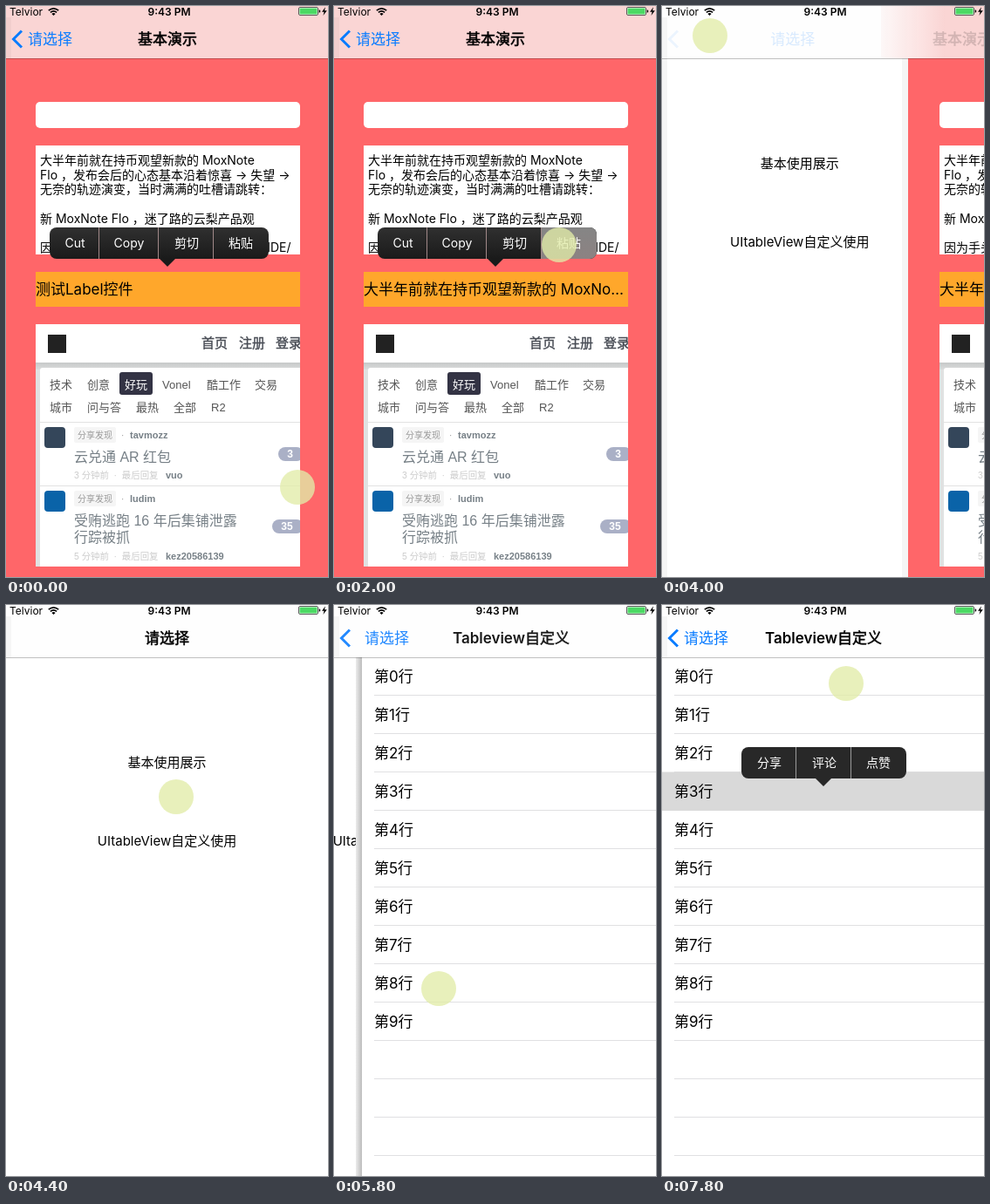
An HTML page that plays this animation: 369x655 px, repeating every 8000 ms.

```html
<!DOCTYPE html>
<html lang="zh-CN">
<head>
<meta charset="utf-8">
<title>基本演示</title>
<style>
@property --x { syntax: "<number>"; inherits: true; initial-value: 0; }

html, body { margin: 0; width: 100%; height: 100%; overflow: hidden; background: #fff; }
svg { display: block; width: 100%; height: 100%; }
text { font: 14px Inter, "Noto Sans CJK SC", "Noto Sans CJK", sans-serif; white-space: pre; }
.mid { text-anchor: middle; }
.t17 { font-size: 17px; }
.t15 { font-size: 15px; }
.t12 { font-size: 12px; }
.semi { font-weight: 600; }
.medium { stroke: #000; stroke-width: .5px; }
.blue { fill: #0a7cff; }
.menu text { fill: #fff; text-anchor: middle; }

.web text { font-family: "Liberation Sans", "Noto Sans CJK SC", "Noto Sans CJK", sans-serif; font-size: 13px; fill: #555; }
.web .head { font-size: 15px; fill: #484c55; stroke: #484c55; stroke-width: .4px; }
.web .tag { font-size: 10px; fill: #999; }
.web .user { font-size: 11px; font-weight: 700; fill: #778087; }
.web .topic { font-size: 16px; fill: #778087; }
.web .meta { font-size: 10.4px; fill: #ccc; }
.web .count { font-size: 12px; font-weight: 700; fill: #fff; text-anchor: middle; }

/* --x is the left edge of the pushed page */
#stage, .anim { animation: 8s step-end -10ms infinite; }
#stage { animation-name: slide; --p: calc(var(--x) / 369); }
.page { transform: translateX(calc(var(--x) * 1px)); }
.home { transform: translateX(calc((var(--x) - 369) * .315px)); }
.tint { transform: translateX(calc((var(--x) + min(40, var(--x))) * 1px)); }
.pageTitle { transform: translateX(calc(var(--x) * .56px)); }
.backText { transform: translateX(calc(134px * var(--p) * (.84 + .16 * var(--p)))); }
.pageTitle, .dim { opacity: calc(1 - 1.1 * var(--p)); }
.chevron { opacity: calc(1 - 1.2 * var(--p)); }
.fadeIn { opacity: calc((var(--p) - .8) * 5); }

#basic, #basicNav { animation-name: first; }
#table, #tableNav { animation-name: second; }
#edit { animation-name: edit; }
#paste { animation-name: paste; }
#before { animation-name: before; }
#after { animation-name: after; }
#back { animation-name: press; }
#edge { animation-name: edge; }
#row1 { animation-name: row1; }
#row3 { animation-name: row3; }
#share { animation-name: share; }
#dot { animation-name: dot; }

@keyframes slide {
  0% { --x: 0; } 47.5% { --x: 75; } 50% { --x: 284; } 52.5% { --x: 362; } 55% { --x: 369; }
  67.5% { --x: 357; } 70% { --x: 165; } 72.5% { --x: 32; } 75%, 100% { --x: 0; }
}
@keyframes first { 0% { opacity: 1; } 55%, 100% { opacity: 0; } }
@keyframes second { 0% { opacity: 0; } 62.5%, 100% { opacity: 1; } }
@keyframes edit { 0% { opacity: 1; } 27.5%, 100% { opacity: 0; } }
@keyframes paste { 0% { opacity: 0; } 20%, 100% { opacity: 1; } }
@keyframes before { 0% { opacity: 1; } 25%, 100% { opacity: 0; } }
@keyframes after { 0% { opacity: 0; } 25%, 100% { opacity: 1; } }
@keyframes press { 0% { opacity: 1; } 42.5% { opacity: .4; } 45% { opacity: .25; } 47.5%, 100% { opacity: 1; } }
@keyframes edge { 0% { opacity: 0; } 47.5% { opacity: 1; } 55%, 100% { opacity: 0; } }
@keyframes row1 { 0% { opacity: 0; } 82.5% { opacity: 1; } 95% { opacity: .5; } 97.5%, 100% { opacity: 0; } }
@keyframes row3 { 0% { opacity: 0; } 92.5%, 100% { opacity: 1; } }
@keyframes share {
  0% { opacity: 0; transform: translateY(-88px); }
  85% { opacity: 1; transform: translateY(-88px); }
  92.5% { opacity: 0; transform: none; }
  97.5%, 100% { opacity: 1; transform: none; }
}
@keyframes dot {
  0% { transform: translate(334px, 552px); }
  2.5% { transform: translate(318px, 505px); }
  5% { transform: translate(275px, 425px); }
  7.5% { transform: translate(205px, 340px); }
  10% { transform: translate(130px, 275px); }
  12.5% { transform: translate(80px, 330px); }
  15% { transform: translate(74px, 476px); }
  17.5% { transform: translate(27px, 59px); }
  20% { transform: translate(258px, 274px); }
  30% { transform: translate(300px, 420px); }
  32.5% { transform: translate(200px, 546px); }
  35% { transform: translate(110px, 300px); }
  37.5% { transform: translate(75px, 89px); }
  40% { transform: translate(55px, 34px); }
  52.5% { transform: translate(150px, 120px); }
  55% { transform: translate(195px, 220px); }
  57.5% { transform: translate(215px, 275px); }
  62.5% { transform: translate(208px, 262px); }
  65% { transform: translate(203px, 251px); }
  72.5% { transform: translate(120px, 440px); }
  75% { transform: translate(20px, 612px); }
  77.5% { transform: translate(254px, 93px); }
  82.5% { transform: translate(230px, 122px); }
  87.5% { transform: translate(228px, 150px); }
  90% { transform: translate(222px, 185px); }
  92.5% { transform: translate(218px, 219px); }
  95% { transform: translate(216px, 150px); }
  97.5%, 100% { transform: translate(211px, 90px); }
}
</style>
</head>
<body>
<svg id="stage" viewBox="0 0 369 655" preserveAspectRatio="none">
  <defs>
    <linearGradient id="shade">
      <stop offset="0" stop-color="#ececec"/>
      <stop offset="1" stop-color="#bcbcbc"/>
    </linearGradient>
    <linearGradient id="blush">
      <stop offset="0" stop-color="#fad5d4" stop-opacity=".15"/>
      <stop offset="1" stop-color="#fad5d4"/>
    </linearGradient>
    <linearGradient id="band" x2="0" y2="1">
      <stop offset="0" stop-color="#c6c8c8"/>
      <stop offset="1" stop-color="#dadcdc"/>
    </linearGradient>
    <linearGradient id="ink" x2="0" y2="1">
      <stop offset="0" stop-color="#303030"/>
      <stop offset="1" stop-color="#1a1a1a"/>
    </linearGradient>
    <linearGradient id="lit" x2="0" y2="1">
      <stop offset="0" stop-color="#858585"/>
      <stop offset="1" stop-color="#8c8282"/>
    </linearGradient>
    <clipPath id="noteBox"><path d="M34 160h303v125h-303z"/></clipPath>
    <clipPath id="webBox"><path d="M34 365h303v278h-303z"/></clipPath>
  </defs>

  <path fill="#fff" d="M0 0h369v655h-369z"/>
  <g class="home">
    <text class="mid t15" x="184.5" y="185.5">基本使用展示</text>
    <text class="mid t15" x="184.5" y="275.5">UItableView自定义使用</text>
  </g>
  <path id="edge" class="anim" fill="#f5f5f5" d="M0 60h6v595h-6z"/>

  <g id="basic" class="anim"><g class="page">
    <path fill="#f5f5f5" d="M-9 60h7v595h-7z"/>
    <path fill="#ff6669" d="M-2 60h371v595h-371z"/>
    <rect x="34" y="110" width="303" height="30" rx="5" fill="#fff"/>
    <path fill="#fff" d="M34 160h303v125h-303z"/>
    <g clip-path="url(#noteBox)">
      <text x="39" y="182">大半年前就在持币观望新款的 MoxNote</text>
      <text x="39" y="198.7">Flo ，发布会后的心态基本沿着惊喜 → 失望 →</text>
      <text x="39" y="215.4">无奈的轨迹演变，当时满满的吐槽请跳转：</text>
      <text x="39" y="248.8">新 MoxNote Flo ，迷了路的云梨产品观</text>
      <text x="39" y="282.2">因为手头的 2013 款 MoxNote Lix 在多开 IDE/</text>
    </g>
    <path fill="#ffa72b" d="M34 305h303v40h-303z"/>
    <text id="before" class="anim t17" x="34" y="331">测试Label控件</text>
    <text id="after" class="anim t17" x="34" y="331">大半年前就在持币观望新款的 MoxNo…</text>

    <g class="web" clip-path="url(#webBox)">
      <path fill="#e0e2e2" d="M34 365h303v278h-303z"/>
      <path fill="#fff" d="M34 365h303v44h-303z"/>
      <path fill="url(#band)" d="M34 409h303v8h-303z"/>
      <rect x="39" y="415" width="310" height="240" rx="3" fill="#fff"/>
      <rect x="48" y="377" width="21" height="21" fill="#222"/>
      <text class="head" x="224" y="392">首页</text>
      <text class="head" x="267" y="392">注册</text>
      <text class="head" x="309" y="392">登录</text>

      <rect x="130" y="420" width="38" height="26" rx="3" fill="#334"/>
      <text x="50" y="438.5">技术</text>
      <text x="93" y="438.5">创意</text>
      <text x="136" y="438.5" style="fill:#fff">好玩</text>
      <text x="179" y="438.5">Vonel</text>
      <text x="230" y="438.5">酷工作</text>
      <text x="285" y="438.5">交易</text>
      <text x="50" y="464.5">城市</text>
      <text x="93" y="464.5">问与答</text>
      <text x="149" y="464.5">最热</text>
      <text x="192" y="464.5">全部</text>
      <text x="235" y="464.5">R2</text>
      <path stroke="#e2e2e2" d="M39 477.5h298m-298 73h298"/>

      <rect x="44" y="483" width="24" height="24" rx="4" fill="#34465a"/>
      <rect x="78" y="483" width="48" height="18" rx="2" fill="#f5f5f5"/>
      <text class="tag" x="82" y="495.5">分享发现</text>
      <text class="tag" x="132" y="495.5">·</text>
      <text class="user" x="142" y="495.5">tavmozz</text>
      <text class="topic" x="78" y="523">云兑通 AR 红包</text>
      <text class="meta" x="78" y="542">3 分钟前  ·  最后回复</text>
      <text class="user" x="183" y="542">vuo</text>
      <rect x="312" y="506" width="29" height="16" rx="8" fill="#aab0c6"/>
      <text class="count" x="325.5" y="518.3">3</text>

      <rect x="44" y="556" width="24" height="24" rx="4" fill="#0a63a8"/>
      <rect x="78" y="556" width="48" height="18" rx="2" fill="#f5f5f5"/>
      <text class="tag" x="82" y="568.5">分享发现</text>
      <text class="tag" x="132" y="568.5">·</text>
      <text class="user" x="142" y="568.5">ludim</text>
      <text class="topic" x="78" y="595.5">受贿逃跑 16 年后集铺泄露</text>
      <text class="topic" x="78" y="615">行踪被抓</text>
      <text class="meta" x="78" y="635">5 分钟前  ·  最后回复</text>
      <text class="user" x="183" y="635">kez20586139</text>
      <rect x="305" y="589" width="36" height="16" rx="8" fill="#aab0c6"/>
      <text class="count" x="322" y="601.3">35</text>
    </g>

    <g id="edit" class="anim menu">
      <rect x="50" y="254" width="251" height="36" rx="8" fill="url(#ink)"/>
      <path fill="#1a1a1a" d="M176 290h18l-9 9z"/>
      <path id="paste" class="anim" fill="url(#lit)" d="M238 254h55a8 8 0 0 1 8 8v20a8 8 0 0 1-8 8h-55z"/>
      <path stroke="#a08888" d="M106.5 254v36m68-36v36m63-36v36"/>
      <text x="79" y="277">Cut</text>
      <text x="141" y="277">Copy</text>
      <text x="207" y="277">剪切</text>
      <text x="269" y="277">粘贴</text>
    </g>
  </g></g>

  <g id="table" class="anim"><g class="page">
    <path fill="url(#shade)" d="M-7 60h7v595h-7z"/>
    <path fill="#fff" d="M0 60h369v595h-369z"/>
    <path stroke="#e0e0e2" d="M14 103.5H369m-355 44H369m-355 44H369m-355 44H369m-355 44H369m-355 44H369m-355 44H369m-355 44H369m-355 44H369m-355 44H369m-355 44H369m-355 44H369m-355 44H369"/>
    <path id="row1" class="anim" fill="#d9d9d9" d="M0 103.5h369v44.5h-369z"/>
    <path id="row3" class="anim" fill="#d9d9d9" d="M0 191.5h369v44.5h-369z"/>
    <text class="t17" x="14" y="88">第0行</text>
    <text class="t17" x="14" y="132">第1行</text>
    <text class="t17" x="14" y="176">第2行</text>
    <text class="t17" x="14" y="220">第3行</text>
    <text class="t17" x="14" y="264">第4行</text>
    <text class="t17" x="14" y="308">第5行</text>
    <text class="t17" x="14" y="352">第6行</text>
    <text class="t17" x="14" y="396">第7行</text>
    <text class="t17" x="14" y="440">第8行</text>
    <text class="t17" x="14" y="484">第9行</text>
    <g id="share" class="anim menu">
      <rect x="91" y="163" width="189" height="36" rx="8" fill="#282828"/>
      <path fill="#282828" d="M176 199h18l-9 9z"/>
      <path stroke="#9a9a9a" d="M153.5 163v36m63-36v36"/>
      <text x="123" y="186">分享</text>
      <text x="186" y="186">评论</text>
      <text x="248" y="186">点赞</text>
    </g>
  </g></g>

  <path fill="#fefefe" d="M0 0h369v60h-369z"/>
  <g id="basicNav" class="anim">
    <g class="tint">
      <path fill="url(#blush)" d="M-73 0h73v60h-73z"/>
      <path fill="#fad5d4" d="M0 0h369v60h-369z"/>
    </g>
    <text class="pageTitle mid t17 medium" x="185" y="44">基本演示</text>
  </g>
  <g id="tableNav" class="anim">
    <text class="pageTitle mid t17 semi" x="185" y="44">Tableview<tspan class="medium" font-weight="400" style="font-weight:400">自定义</tspan></text>
  </g>
  <path fill="#000" fill-opacity=".03" d="M0 13h6v47h-6z"/>
  <path stroke="#000" stroke-opacity=".25" d="M0 60.5h369"/>
  <g id="back" class="anim">
    <path class="chevron" fill="none" stroke="#0a7cff" stroke-width="3" d="M18 28.5L8.5 38l9.5 9.5"/>
    <g class="backText">
      <text class="dim t17 blue" x="25" y="44">请选择</text>
      <text class="fadeIn t17 medium" x="25" y="44">请选择</text>
    </g>
  </g>

  <text class="t12" x="4" y="10.5">Telvior</text>
  <g fill="none" stroke="#000" stroke-width="1.7">
    <path d="M48.8 5.2q5.7-4.8 11.4 0M50.9 7.4q3.6-3 7.2 0"/>
    <path fill="#000" stroke="none" d="M52.4 8.9q2.1-1.7 4.2 0l-2.1 2.2z"/>
  </g>
  <text class="t12 semi mid" x="187" y="10.5">9:43 PM</text>
  <rect x="335.5" y="1.5" width="22" height="9" rx="1.5" fill="#fff" stroke="#333" stroke-width=".8"/>
  <rect x="336.5" y="2.5" width="20" height="7" rx=".5" fill="#4cd964"/>
  <path d="M358.7 4.2q1.6.3 1.6 1.8t-1.6 1.8zM366 1.2l-4 5.5h2.6l-1.2 4.3 4.4-5.8h-2.8z"/>

  <circle id="dot" class="anim" r="20" fill="#e2eca8" fill-opacity=".78"/>
</svg>
</body>
</html>
```
